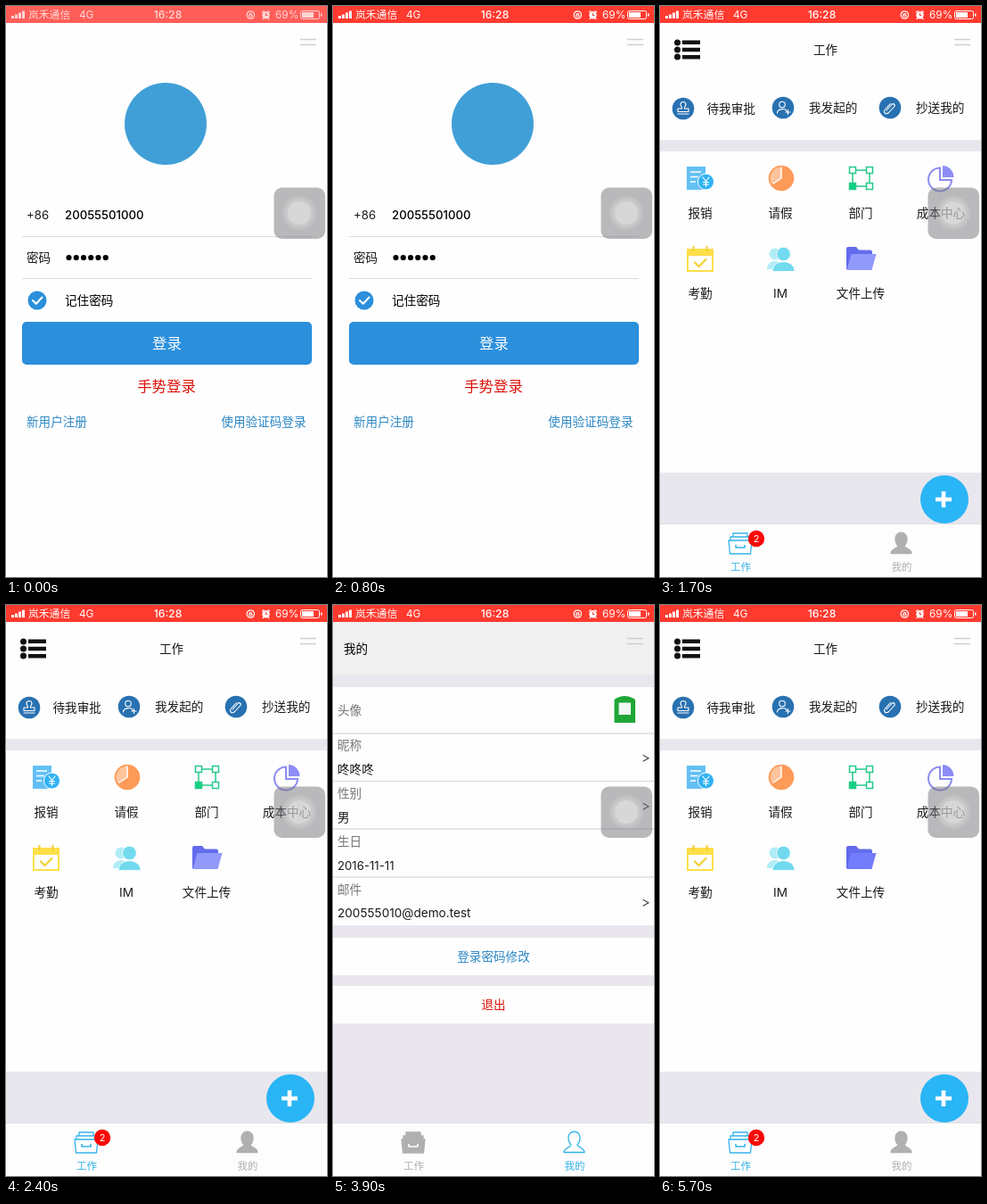
Animation of 360 by 640 pixels, one loop 5800 ms. Source, as an HTML page:

```html
<!DOCTYPE html>
<html lang="zh-CN">
<head>
<meta charset="utf-8">
<style>
html, body { margin: 0; width: 100%; height: 100%; overflow: hidden; background: #fefefe; }
svg { display: block; width: 360px; height: 640px; }
text { font: 13.6px Inter, "Noto Sans CJK SC", "Noto Sans CJK", sans-serif; fill: #1a1a1a; }
.num { font-size: 13.2px; }
.big { font-size: 16.4px; }
.strong { font-weight: 500; fill: #000; }
.mid { text-anchor: middle; }
.end { text-anchor: end; }
.grey { fill: #777; }
.link { fill: #2b87c4; }
.red { fill: #dc1208; }
.white, #status text { fill: #fff; }
#status text { font-size: 11.8px; }
.tab { font-size: 11.5px; text-anchor: middle; fill: currentColor; }
.on { color: #35b3ea; --body: #fff; --slot: #35b3ea; }
.off { color: #b0b0b0; --body: #b0b0b0; --slot: #fff; }
.line { fill: none; stroke-linecap: round; stroke-linejoin: round; }
</style>
</head>
<body>
<svg viewBox="0 0 360 640">
  <defs>
    <g id="drawer" stroke="currentColor" stroke-width="1.3" stroke-linejoin="round" fill="var(--body)">
      <path d="M82 595V591H98V595M79 599V595H101V599"/>
      <path d="M77 599H103L101.500 614H78.500Z"/>
      <path d="M85 604V607H95V604" fill="none" stroke="var(--slot)" stroke-width="1.6"/>
    </g>
    <path id="person" stroke="currentColor" stroke-width="1.3" stroke-linejoin="round" fill="var(--body)"
      d="M267 605C264 602 264 599 264 597C264 588 277 588 277 597C277 599 277 602 274 605C274 608 282 608 282 613.500H259C259 608 267 608 267 605Z"/>
    <g id="tabs">
      <path d="M0 581H360V640H0Z" fill="#fdfdfd"/>
      <path d="M0 580.500H360" stroke="#dddde1"/>
    </g>
  </defs>

  <rect width="360" height="640" fill="#fefefe"/>

  <g id="login">
    <circle cx="179" cy="132" r="46" fill="#419fd7"/>
    <text class="num" x="23" y="238.500">+86</text>
    <text class="num strong" x="66" y="238.500">20055501000</text>
    <text x="23" y="287">密码</text>
    <path d="M70.500 282H113" stroke="#000" stroke-width="6.200" stroke-linecap="round" stroke-dasharray="0 8.250"/>
    <path d="M18 258.500H343M18 305.500H343" stroke="#dcdce0"/>
    <circle cx="35" cy="330" r="10.500" fill="#2b8fdb"/>
    <path class="line" d="M30 330L33.800 333.800L40.500 326.500" stroke="#fff" stroke-width="2"/>
    <text class="strong" x="66" y="334.500">记住密码</text>
    <rect x="18" y="354" width="325" height="48" rx="5" fill="#2b8fdc"/>
    <text class="big mid white" x="180.500" y="384">登录</text>
    <text class="big mid red" x="180" y="432">手势登录</text>
    <text class="link" x="23" y="470.500">新用户注册</text>
    <text class="link end" x="336.500" y="470.500">使用验证码登录</text>
  </g>

  <g id="work">
    <g fill="#111">
      <path d="M25 38.500H45V43H25ZM25 46.700H45V51.200H25ZM25 55H45V59.500H25Z"/>
      <circle cx="19.500" cy="41" r="3.500"/><circle cx="19.500" cy="49" r="3.500"/><circle cx="19.500" cy="57" r="3.500"/>
    </g>
    <text class="mid" x="185.500" y="54">工作</text>

    <g fill="#2871b1"><circle cx="26" cy="115" r="12.300"/><circle cx="138" cy="114" r="12.300"/><circle cx="258" cy="114" r="12.300"/></g>
    <g class="line" stroke="#fff" stroke-width="1.100">
      <path d="M24.500 115C25 113 23 112 23 110.500A3 3 0 0 1 29 110.500C29 112 27 113 27.500 115H32V118.500H20V115ZM20 121H32"/>
      <path d="M131.500 120C131.500 115 142 114 142 118M141 119H146M143.500 116.500V121.500"/>
      <circle cx="137" cy="110.500" r="3.300"/>
      <path d="M254 117L260 110.500C262 108.500 264.500 111 262.500 113L256.500 119.500C253 122.500 250 119 252.500 116L258.500 109.500"/>
    </g>
    <text x="52.500" y="120">待我审批</text>
    <text x="167" y="119">我发起的</text>
    <text x="287" y="119">抄送我的</text>
    <path d="M0 150H360V163H0ZM0 523H360V581H0Z" fill="#e9e7ee"/>

    <path d="M30 180H51V206H30Z" fill="#63c0f5"/>
    <path d="M34 186H46M34 191.500H43M34 197H40" stroke="#fff" stroke-width="1.700"/>
    <circle cx="51.500" cy="197" r="9" fill="#31b2f3" stroke="#fff"/>
    <path class="line" d="M48 192L51.500 196.500L55 192M51.500 196.500V202.500M48.500 197.500H54.500M48.500 200H54.500" stroke="#fff" stroke-width="1.200"/>

    <circle cx="136" cy="193" r="14.300" fill="#fd9a58"/>
    <path d="M136 193V180.500A12.500 12.500 0 0 0 125.500 199.500Z" fill="#ffc49d"/>
    <path class="line" d="M136 181V193L127 199" stroke="#fff" stroke-width="1.500"/>

    <g fill="none" stroke="#25c98a" stroke-width="1.500">
      <path d="M219 184H232M219 202H232M216 187V199M235 187V199"/>
      <path d="M212.500 180.500H219.500V187.500H212.500ZM231.500 180.500H238.500V187.500H231.500ZM231.500 198.500H238.500V205.500H231.500Z"/>
      <path d="M212.500 198.500H219.500V205.500H212.500Z" fill="#0fd47f"/>
    </g>

    <path d="M314 181.500A13 13 0 1 0 327 195H314Z" fill="none" stroke="#8c8df0" stroke-width="2"/>
    <path d="M317 179A13 13 0 0 1 329.500 192H317Z" fill="#8c8df5"/>

    <path d="M31 273H59V297H31Z" fill="#fff" stroke="#fddf4a" stroke-width="2"/>
    <path d="M30 272H60V280H30Z" fill="#fddf4a"/>
    <path d="M37.500 269V275M52.500 269V275" stroke="#f4cb35" stroke-width="2"/>
    <path class="line" d="M39 287.500L43.500 292L51.500 284" stroke="#f5cf38" stroke-width="2.300"/>

    <g fill="#b0edf6"><circle cx="129" cy="278" r="6.500"/><path d="M120 295C120 283 138 283 138 295Z"/></g>
    <g fill="#72daef" stroke="#fefefe" stroke-width=".8"><circle cx="138.500" cy="278" r="7.800"/><path d="M126 297.500C126 283 151 283 151 297.500Z"/></g>

    <path d="M209 272Q209 270 211 270H220L223 273.500H236Q238 273.500 238 276V295H209Z" fill="#636cec"/>
    <path id="flap" d="M214.500 278H242.500L237.500 296H209.500Z"/>

    <g class="mid">
      <text x="45" y="237">报销</text><text x="135" y="237">请假</text><text x="225" y="237">部门</text><text x="315" y="237">成本中心</text>
      <text x="45" y="327">考勤</text><text x="135" y="326.500">IM</text><text x="225" y="327">文件上传</text>
    </g>

    <use href="#tabs"/>
    <circle cx="319" cy="553" r="27" fill="#2ab5f6"/>
    <path d="M309 553H327M318 544V562" stroke="#fff" stroke-width="4.600"/>
    <g class="on"><use href="#drawer"/><text class="tab" x="90.500" y="633">工作</text></g>
    <circle cx="108" cy="597" r="9.200" fill="#fa0808"/>
    <text class="mid white" x="108" y="601" style="font-size:11px">2</text>
    <g class="off"><use href="#person"/><text class="tab" x="271" y="633">我的</text></g>
  </g>

  <g id="mine">
    <path d="M0 19H360V581H0Z" fill="#e9e7ed"/>
    <path d="M0 19H360V78H0Z" fill="#f1f0f1"/>
    <path d="M0 92H360V359H0ZM0 373H360V415H0ZM0 427H360V469H0Z" fill="#fefefe"/>
    <path d="M0 144H360M0 197.500H360M0 251H360M0 305H360" stroke="#dddce1" stroke-width="1.600"/>
    <text class="strong" x="12" y="54">我的</text>
    <text class="grey" x="5" y="123">头像</text>
    <text class="grey" x="5" y="162">昵称</text>
    <text class="grey" x="5" y="216">性别</text>
    <text class="grey" x="5" y="270">生日</text>
    <text class="grey" x="5" y="324">邮件</text>
    <text x="5" y="189">咚咚咚</text>
    <text x="5" y="243">男</text>
    <text class="num" x="5" y="296.500">2016-11-11</text>
    <text x="5" y="350">200555010@demo.test</text>
    <path d="M315.500 106Q327 98 339 106V132H315.500Z" fill="#1fa637"/>
    <path d="M320.500 109.500H334V123H320.500Z" fill="#f1f7f1"/>
    <path class="line" d="M348 168.500L354 171.700L348 175M348 222.500L354 225.700L348 229M348 330.500L354 333.700L348 337" stroke="#444" stroke-width="1.200"/>
    <text class="mid link" x="180" y="399">登录密码修改</text>
    <text class="mid red" x="180" y="453">退出</text>
    <use href="#tabs"/>
    <g class="off"><use href="#drawer"/><text class="tab" x="90.500" y="633">工作</text></g>
    <g class="on"><use href="#person"/><text class="tab" x="271" y="633">我的</text></g>
  </g>

  <path d="M330 37.500H348M330 43.500H348" stroke="#cfcfcf" stroke-width="1.600"/>

  <rect id="bar" width="360" height="19"/>
  <g id="status">
    <path d="M6 11H9V14H6ZM10 9.500H13V14H10ZM14 7.500H17V14H14ZM18 5.500H21V14H18Z" fill="#fff"/>
    <text x="25" y="14">岚禾通信</text>
    <text x="82" y="14">4G</text>
    <text class="mid" x="181.500" y="14.300" style="font-size:12.2px;font-weight:500">16:28</text>
    <g class="line" stroke="#fff" stroke-width="1.200">
      <circle cx="274.300" cy="10" r="4.200"/>
      <path d="M272.700 10H276V12H272.700ZM273.200 10V8.500H275.500V10" stroke-width=".9"/>
      <circle cx="291.500" cy="10.300" r="3.600" fill="#fff"/>
      <path d="M287.500 6.800L289 5.700M295.500 6.800L294 5.700M289 13.500L288 14.500M294 13.500L295 14.500"/>
      <path d="M291.500 8.300V10.500H293" stroke="#f55046"/>
      <rect x="330.500" y="5.500" width="21" height="9" rx="2" stroke-width="1"/>
    </g>
    <path d="M332 7H345V13H332ZM353 8.500H354.500V11.500H353Z" fill="#fff"/>
    <text x="302" y="14.200">69%</text>
  </g>

  <g>
    <rect x="300.500" y="203.500" width="57.500" height="57.500" rx="9" fill="#77757b" opacity=".5"/>
    <circle cx="329" cy="232" r="19" fill="#fff" opacity=".12"/>
    <circle cx="329" cy="232" r="16" fill="#fff" opacity=".12"/>
    <circle cx="329" cy="232" r="13" fill="#fff" opacity=".28"/>
  </g>
</svg>
<script>
const LOOP = 5800;
const $ = id => document.getElementById(id);
const show = (id, on) => $(id).style.display = on ? '' : 'none';

function draw(now) {
  const t = now % LOOP;
  const login = t < 1200, mine = t >= 2600 && t < 4350;
  show('login', login);
  show('mine', mine);
  show('work', !login && !mine);
  // The form drops by the height of the status bar just before it leaves.
  $('login').setAttribute('transform', `translate(0 ${t < 1000 ? 0 : 19})`);
  const pale = Math.max(0, 1 - t / 300);
  $('bar').setAttribute('fill', `rgb(255 ${58 + 36 * pale} ${47 + 41 * pale})`);
  $('status').setAttribute('opacity', 1 - 0.25 * pale);
  $('flap').setAttribute('fill', t < 5500 ? '#9199fb' : '#737dfb');
  requestAnimationFrame(() => draw(performance.now()));
}
draw(performance.now());
</script>
</body>
</html>
```
